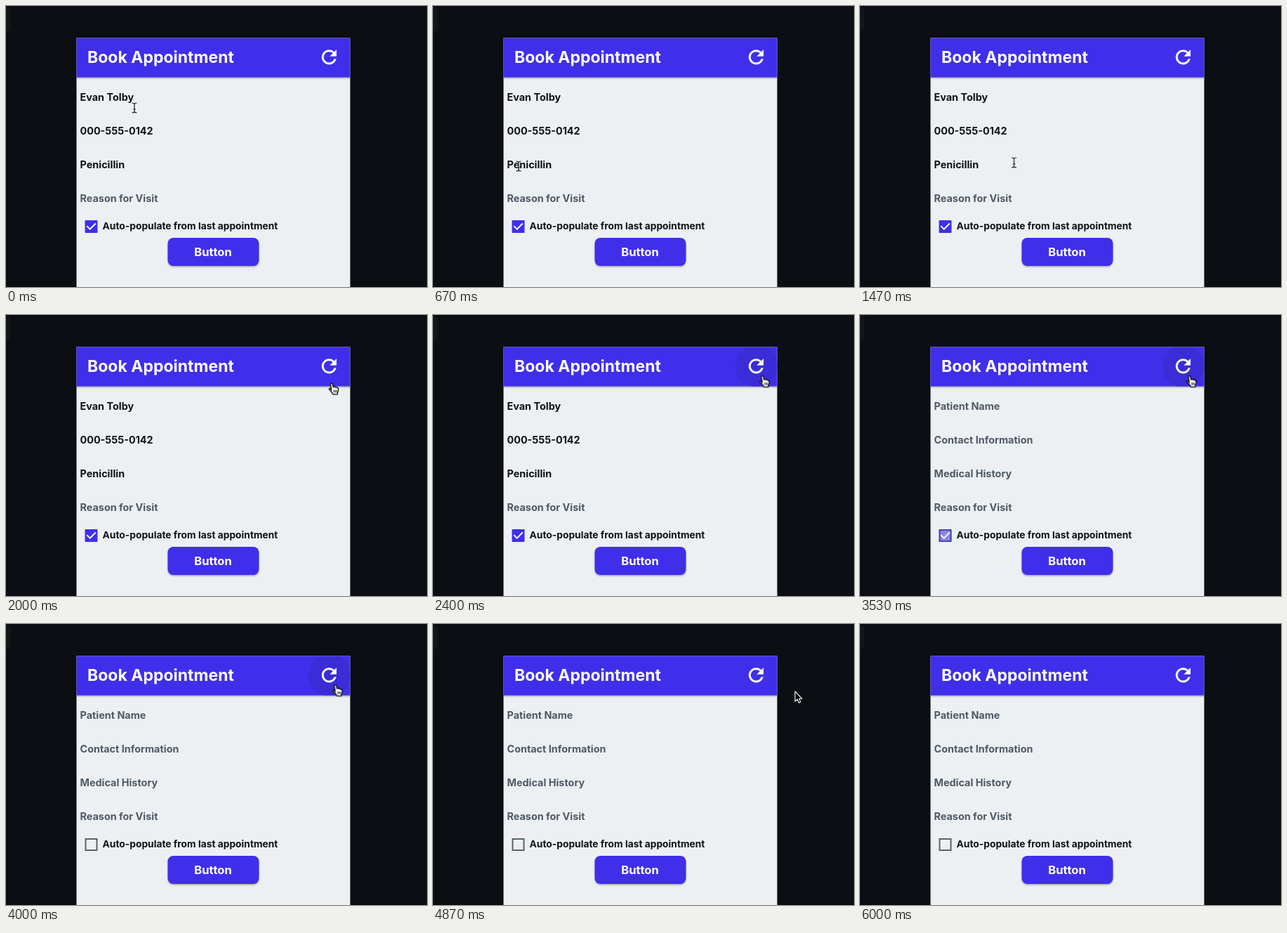
Recreate the animation shown at these times as an HTML page. Size 600 by 400 pixels, loop 6340 ms.

```html
<!DOCTYPE html>
<html lang="en">
<head>
<meta charset="utf-8">
<title>Book Appointment</title>
<style>
  :root {
    --loop: 6340ms;
    --primary: #402fea;
    --ink: #0f1317;
    --muted: #4f5a64;
  }
  html, body { margin: 0; width: 100%; height: 100%; overflow: hidden; background: #0b0e12; }
  svg { display: block; width: 100vw; height: 100vh; }
  text { font: 700 14.4px Inter, "Open Sans", sans-serif; fill: var(--ink); }
  .title { font-size: 23px; fill: #fff; }
  .option { font-size: 13.8px; }
  .action { font-size: 16.6px; fill: #fff; text-anchor: middle; }
  .hint { fill: var(--muted); }
  .primary { fill: var(--primary); }
  .shadow { filter: blur(1.2px); opacity: .3; }

  /* Hard on/off states */
  .filled, .empty, .hover, .beam, .hand, .arrow {
    visibility: hidden;
    animation: var(--loop) step-end infinite;
  }
  .filled { animation-name: filled; }
  .empty { animation-name: empty; }
  .hover { animation-name: hover; }
  .beam { animation-name: beam; }
  .hand { animation-name: hand; }
  .arrow { animation-name: arrow; }
  .box { animation: uncheck var(--loop) linear infinite; }
  .cursor { animation: move var(--loop) step-end infinite; }

  @keyframes filled { 0% { visibility: visible } 54.65%, 100% { visibility: hidden } }
  @keyframes empty { 0% { visibility: hidden } 54.65%, 100% { visibility: visible } }
  @keyframes hover {
    0% { visibility: hidden }
    32.57% { visibility: visible }
    76.75%, 100% { visibility: hidden }
  }
  @keyframes beam { 0% { visibility: visible } 30.44%, 100% { visibility: hidden } }
  @keyframes hand {
    0% { visibility: hidden }
    30.44% { visibility: visible }
    76.75%, 100% { visibility: hidden }
  }
  @keyframes arrow {
    0% { visibility: hidden }
    76.75% { visibility: visible }
    78.8%, 100% { visibility: hidden }
  }
  @keyframes uncheck { 0%, 54.65% { opacity: 1 } 57%, 100% { opacity: 0 } }

  @keyframes move {
    0%     { transform: translate(183px, 145px); animation-timing-function: steps(10) }
    10.5%  { transform: translate(122px, 228px) }
    11.6%  { transform: translate(122px, 228px); animation-timing-function: steps(5) }
    16.88% { transform: translate(150px, 252px); animation-timing-function: steps(5) }
    22.08% { transform: translate(205px, 230px) }
    23.1%  { transform: translate(219.5px, 223px); animation-timing-function: steps(4) }
    27.37% { transform: translate(355px, 155px); animation-timing-function: steps(4) }
    31.47% { transform: translate(467px, 106px) }
    32.57% { transform: translate(469px, 98px); animation-timing-function: steps(5) }
    37.8%  { transform: translate(472.5px, 95.5px) }
    75.65% { transform: translate(484px, 98px) }
    76.75% { transform: translate(520px, 104px) }
    77.75%, 100% { transform: translate(570px, 114px) }
  }
</style>
</head>
<body>
<svg viewBox="0 0 600 400">
  <defs>
    <clipPath id="bar"><path d="M101 46h389.5v55.5h-389.5z"/></clipPath>
    <clipPath id="below"><path d="M101 101h389v10h-389z"/></clipPath>
    <path id="beam" d="M-3.5-7Q0-7 0-5Q0-7 3.5-7M0-5V5M-3.5 7Q0 7 0 5Q0 7 3.5 7M-1.8 2H1.8"/>
  </defs>

  <rect width="600" height="400" fill="#0b0e12"/>
  <rect x="-8" y="2" width="14" height="34" rx="4" fill="#14171a"/>
  <rect y="399" width="600" height="1" fill="#07090b"/>

  <rect x="100.5" y="45.5" width="390" height="355" fill="#edf0f3"/>
  <g clip-path="url(#below)">
    <rect class="shadow" x="95" y="47" width="401" height="56"/>
  </g>
  <rect class="primary" x="100.5" y="45.5" width="390" height="56"/>
  <circle class="hover" cx="461" cy="73" r="30" fill="#3a2cd6" clip-path="url(#bar)"/>
  <text class="title" x="116" y="81">Book Appointment</text>
  <path transform="translate(444.9 57.2) scale(1.3)" fill="#fff" stroke="#fff" stroke-width=".25"
    d="M17.65 6.35C16.2 4.9 14.21 4 12 4c-4.42 0-7.99 3.58-7.99 8s3.57 8 7.99 8c3.73 0 6.84-2.55 7.73-6h-2.08c-.82 2.33-3.04 4-5.65 4-3.31 0-6-2.69-6-6s2.69-6 6-6c1.66 0 3.14.69 4.22 1.78L13 11h7V4z"/>

  <g class="filled">
    <text x="105.5" y="135">Evan Tolby</text>
    <text x="105.5" y="183">000-555-0142</text>
    <text x="105.5" y="231">Penicillin</text>
  </g>
  <g class="empty">
    <text class="hint" x="105.5" y="135">Patient Name</text>
    <text class="hint" x="105.5" y="183">Contact Information</text>
    <text class="hint" x="105.5" y="231">Medical History</text>
    <rect x="113.5" y="306" width="16" height="16" fill="none" stroke="#57636c" stroke-width="2"/>
  </g>
  <text class="hint" x="105.5" y="279">Reason for Visit</text>

  <g class="box">
    <rect class="primary" x="112.5" y="305" width="18" height="18" rx="1"/>
    <path d="M115.2 313.1l4.5 4.5 8.1-8.1" fill="none" stroke="#fff" stroke-width="2"/>
  </g>
  <text class="option" x="137.5" y="318">Auto-populate from last appointment</text>

  <rect class="shadow" x="230.5" y="331.5" width="130" height="40" rx="8"/>
  <rect class="primary" x="230.5" y="330" width="130" height="40" rx="8"/>
  <text class="action" x="295" y="356">Button</text>

  <g class="cursor">
    <g class="beam" fill="none">
      <use href="#beam" stroke="#fff" stroke-opacity=".6" stroke-width="2.4"/>
      <use href="#beam" stroke="#111" stroke-width="1.2"/>
    </g>
    <g class="hand" transform="translate(.2 -1) scale(.92)" fill="#fff" stroke="#000" stroke-width="1.4" stroke-linejoin="round" stroke-linecap="round">
      <path d="M-3.6 2L-5.1-6.4Q-5.2-8.2-3.7-8.4Q-2.4-8.5-2-7L-.9-2.4Q-.5-3.8 .9-3.6Q2-3.4 2.2-2.1Q2.8-3.2 4-2.7Q4.9-2.3 5-1.2Q6-1.8 6.7-.8Q7.2 0 7 2Q6.8 4.5 5.7 6V8.5H-1.4Q-2 6.5-4 4.4L-6.9 1.4Q-7.8 .2-6.8-.5Q-5.8-1-4.6 .4z"/>
      <path d="M.2 2.2V5.4M2.3 2.2V5.4M4.4 2.2V5.4" stroke-width="1"/>
    </g>
    <path class="arrow" d="M-4-8V6.2L-.8 3.2L1.4 8.2L3.8 7.1L1.7 2.3H6z" fill="#000" stroke="#fff" stroke-width="1.1" stroke-linejoin="round"/>
  </g>
</svg>
</body>
</html>
```
